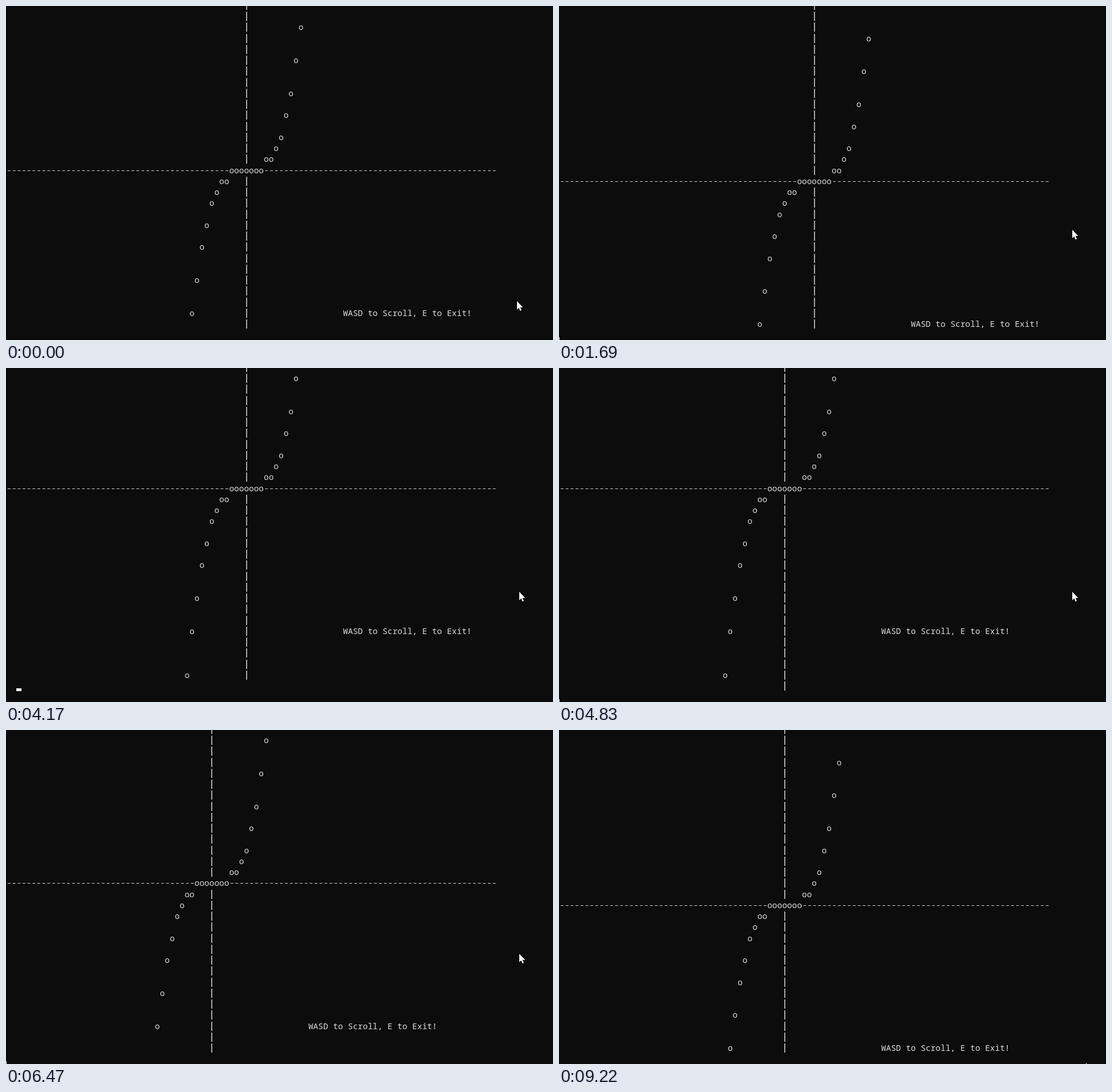
Recreate the animation shown at these times as an HTML page with a canvas. Size 957 px wide and 585 px high, loop 9.32 s.

```html
<!DOCTYPE html>
<html lang="en">
<head>
<meta charset="utf-8">
<title>Console graph</title>
<style>
html, body { margin: 0; width: 100%; height: 100%; overflow: hidden; background: #0c0c0c; }
canvas { display: block; }
</style>
</head>
<body>
<canvas id="stage" width="957" height="585"></canvas>
<script>
const ctx = document.getElementById('stage').getContext('2d');
const LOOP = 9320, COLS = 99, ROWS = 30, CELLS = COLS * ROWS, CW = 8.66, RH = 19.25;
const HINT = 'WASD to Scroll, E to Exit!';
const MOVES = { W: [0, 1], A: [1, 0], S: [0, -1], D: [-1, 0] };

// Each press clears the screen, waits, then prints it cell by cell
const BLANK = 38.2, PRINT = 40.11;

// Held keys: start, keys, repeat interval
const BURSTS = [
  [850, 'AAAWW', 245], [2430, 'SSSS', 195], [3270, 'SSDDD', 206],
  [4320, 'DDDDDD', 214], [5620, 'DWWWWW', 216], [6980, 'AAAA', 240]
];
const presses = BURSTS.flatMap(([start, keys, gap]) =>
  [...keys].map((key, i) => ({ at: start + i * gap, move: MOVES[key] })));

// Pointer tip: time, x, y
const PATH = [
  [0, 894, 517], [260, 837, 437], [320, 852, 451], [500, 852, 451], [600, 898, 392],
  [8450, 898, 392], [8890, 911, 600], [9140, 922, 600], [9220, 922, 583], [LOOP, 922, 583]
];
const ARROW = [[0, 0], [0, 14.7], [3.4, 11.6], [5.6, 17], [7.9, 16], [5.6, 10.8], [10.3, 10.8]];

const midY = r => r * RH - 1.25;
const rect = (color, x, y, w, h) => { ctx.fillStyle = color; ctx.fillRect(x, y, w, h); };

function charAt(dx, dy) {
  if (Math.round(dx ** 3 / 100) === -dy) return 'o';
  if (dy === 13 && dx >= 20 && dx < 20 + HINT.length) return HINT[dx - 20];
  if (dy === 0) return '-';
  return dx === 0 ? '|' : ' ';
}

function drawChar(ch, r, c) {
  const x = c * CW, y = midY(r);
  if (ch === '-') rect('#cccccc', x + 3, Math.round(y), 5, 1);
  else if (ch === '|') rect('#a8a8a8', Math.floor(x + 4.5), Math.round(y) - 8, 2, 16);
  else if (ch !== ' ') {
    ctx.fillStyle = '#dcdcdc';
    ctx.fillText(ch, x + 0.7, y + 5.2);
  }
}

function drawScreen(t) {
  let ax = 48, ay = 15, age = LOOP;
  for (const { at, move } of presses) {
    if (at > t) break;
    ax += move[0];
    ay += move[1];
    age = t - at;
  }
  const printed = Math.round((age - BLANK) / PRINT * CELLS);
  const shown = Math.max(0, Math.min(CELLS, printed));
  for (let i = 0; i < shown; i++) {
    const r = Math.floor(i / COLS), c = i % COLS;
    drawChar(charAt(c - ax, r - ay), r, c);
  }
  if (shown > 0 && shown < CELLS) {
    const r = Math.floor(shown / COLS), c = shown % COLS;
    rect('#f2f2f2', Math.round(c * CW + 0.7), Math.round(midY(r) + 4), 9, 5);
  } else if (t >= presses[0].at && t < 8700) {
    rect('#f2f2f2', 0, 580, 1, 5);
  }
}

function drawPointer(t) {
  const i = PATH.findIndex(p => p[0] > t);
  const [t0, x0, y0] = PATH[i - 1], [t1, x1, y1] = PATH[i];
  const k = (t - t0) / (t1 - t0);
  const x = Math.round(x0 + (x1 - x0) * k), y = Math.round(y0 + (y1 - y0) * k);
  ctx.beginPath();
  for (const [dx, dy] of ARROW) ctx.lineTo(x + dx, y + dy);
  ctx.fillStyle = '#ffffff';
  ctx.fill();
}

function frame() {
  const t = performance.now() % LOOP;
  rect('#0c0c0c', 0, 0, 957, 585);
  ctx.font = '14.43px "Noto Sans Mono", monospace';
  drawScreen(t);
  drawPointer(t);
  requestAnimationFrame(frame);
}
frame();
</script>
</body>
</html>
```
